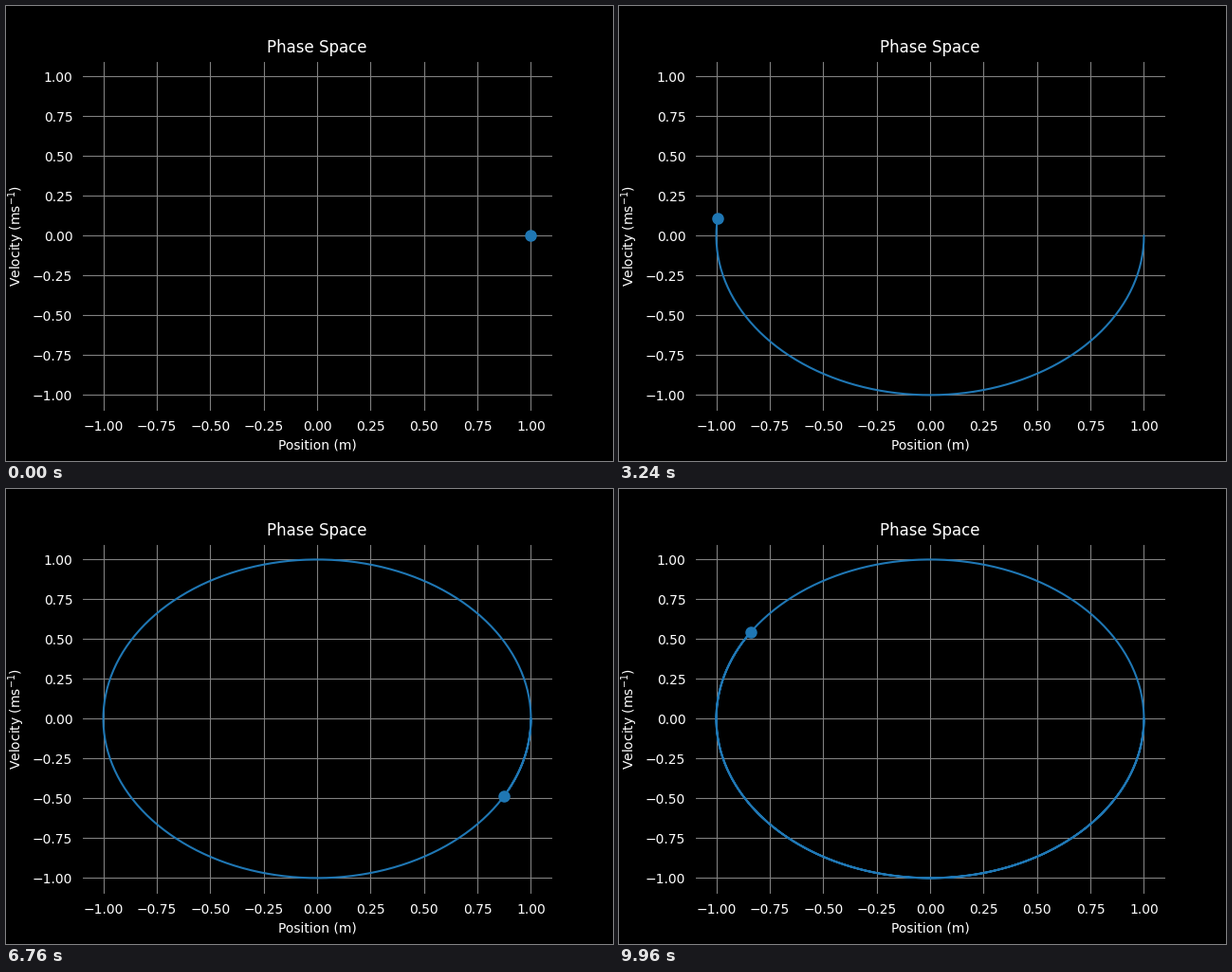
Write a matplotlib script that moves like this. It is 640x480 px and loops after 10000 ms.

```python
import numpy as np
import matplotlib.pyplot as plt
from matplotlib.animation import FuncAnimation

FRAMES = 250
INTERVAL = 40  # ms
BLUE = "#1f77b4"

# Simple harmonic oscillator with unit amplitude and angular frequency
t = np.linspace(0, 10, FRAMES)
position = np.cos(t)
velocity = -np.sin(t)

fig, ax = plt.subplots(figsize=(6.4, 4.8), dpi=100, facecolor="black")
ax.set_facecolor("black")
ax.set_xlim(-1.1, 1.1)
ax.set_ylim(-1.1, 1.1)
ax.set_xticks(np.linspace(-1, 1, 9))
ax.set_yticks(np.linspace(-1, 1, 9))
ax.tick_params(color="black", labelcolor="white")
ax.grid(color="gray")
ax.set_title("Phase Space", color="white")
ax.set_xlabel("Position (m)", color="white")
ax.set_ylabel("Velocity (ms$^{-1}$)", color="white")

trail, = ax.plot([], [], color=BLUE)
dot, = ax.plot([], [], "o", color=BLUE, markersize=8)


def update(i):
    # The trail stops one sample behind the dot
    trail.set_data(position[:i], velocity[:i])
    dot.set_data(position[i:i + 1], velocity[i:i + 1])
    return trail, dot


def init():
    return update(0)


anim = FuncAnimation(fig, update, frames=FRAMES, init_func=init,
                     interval=INTERVAL, repeat=True, repeat_delay=0)
plt.show()
```
